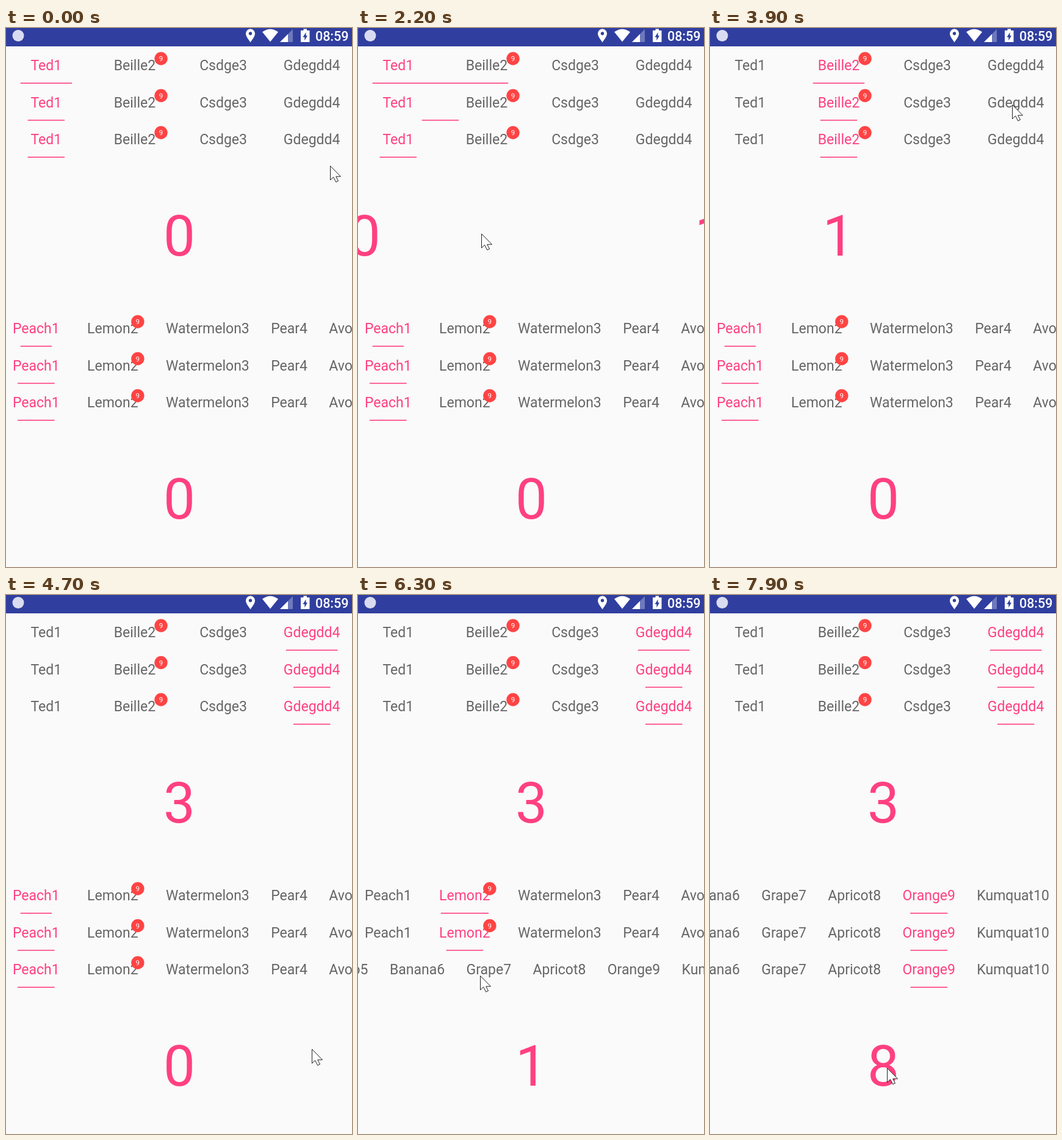
These frames come from a looping animation (567 px wide and 881 px high, 8 s). An HTML page with a canvas:

```html
<!DOCTYPE html>
<html lang="en">
<head>
<meta charset="utf-8">
<title>Tab layouts</title>
<style>
html, body { margin: 0; width: 100%; height: 100%; overflow: hidden; background: #fafafa; }
canvas { display: block; }
</style>
</head>
<body>
<canvas id="stage" width="567" height="881"></canvas>
<script>
const ctx = document.getElementById('stage').getContext('2d');
const W = 567, MID = W / 2, LOOP = 8000, STEP = 100, PAGE_LEAD = 14;
const PINK = '#ff4081', GREY = '#666', RED = '#ff4444';
const FONT = 'Roboto, sans-serif', TAB_FONT = '23px ' + FONT;
const PAD = 11, GAP = 13.4, INSET = 23.6, BAR = 60.5, ROW = 60.5;

const clamp = (v, a, b) => Math.max(a, Math.min(b, v));
const mix = (a, b, f) => a + (b - a) * f;

// Where the pointer turns, starts or stops: [time, x, y]
const POINTER = [
  [0, 531, 225], [1400, 386, 326], [2900, 41, 344], [3000, 41, 344],
  [3600, 430, 330], [3900, 495, 125], [4700, 501, 742], [5550, 11, 733], [5650, 11, 733],
  [6100, 490, 620], [6300, 200, 622], [6800, 475, 622], [7300, 180, 755], [7600, 290, 773]
];
function pointer(t) {
  const i = POINTER.findIndex(key => key[0] > t);
  if (i < 0) return POINTER.at(-1).slice(1);
  const [t0, x0, y0] = POINTER[i - 1], [t1, x1, y1] = POINTER[i];
  const f = (t - t0) / (t1 - t0);
  return [mix(x0, x1, f), mix(y0, y1, f)];
}

// Page position while the pointer drags away from startX, in direction dir
const dragged = (t, page, startX, dir) =>
  page + dir * Math.max(0, dir * (startX - pointer(t)[0])) / W;

// Quintic ease-out
const settle = (t, start, from, to, time) =>
  mix(from, to, 1 - (1 - clamp((t - start) / time, 0, 1)) ** 5);

// Pagers give their position and the selected tab
const TOP_FREE = 2963, TOP_TAP = 3910;
function topPager(t) {
  if (t < TOP_FREE) return { pos: dragged(t, 0, 472, 1), sel: 0 };
  if (t < TOP_TAP) return { pos: settle(t, TOP_FREE, dragged(TOP_FREE, 0, 472, 1), 1, 600), sel: 1 };
  return { pos: settle(t, TOP_TAP, 1, 3, 300), sel: 3 };
}
const LOW_GRAB = 4700, LOW_FREE = 5650, LOW_TAP = 6822, BACK_GRAB = 7330, BACK_FREE = 7540;
function lowPager(t) {
  if (t < LOW_GRAB) return { pos: 0, sel: 0 };
  if (t < LOW_FREE) return { pos: dragged(t, 0, 439, 1), sel: 0 };
  if (t < LOW_TAP) return { pos: settle(t, LOW_FREE, dragged(LOW_FREE, 0, 439, 1), 1, 600), sel: 1 };
  if (t < BACK_GRAB) return { pos: settle(t, LOW_TAP, 1, 9, 600), sel: 9 };
  if (t < BACK_FREE) return { pos: dragged(t, 9, 190, -1), sel: 9 };
  return { pos: settle(t, BACK_FREE, dragged(BACK_FREE, 9, 190, -1), 8, 400), sel: 8 };
}

function layout(names, width) {
  let x = 0;
  return names.map((name, i) => {
    const left = x, right = x + width(name, i);
    x = right + GAP;
    return { name, left, right, mid: (left + right) / 2 };
  });
}
ctx.font = TAB_FONT;
const topTabs = layout(['Ted1', 'Beille2', 'Csdge3', 'Gdegdd4'], () => (W - 3 * GAP) / 4);
const lowTabs = layout(
  ['Peach1', 'Lemon2', 'Watermelon3', 'Pear4', 'Avocado5', 'Banana6', 'Grape7', 'Apricot8', 'Orange9', 'Kumquat10'],
  (name, i) => ctx.measureText(name).width + 2 * PAD + (i === 1 ? 20 : 0));
const maxScroll = lowTabs.at(-1).right - W;

function between(tabs, pos) {
  const i = Math.floor(pos);
  return [tabs[i], tabs[Math.min(i + 1, tabs.length - 1)], pos - i];
}
function midAt(tabs, pos) {
  const [a, b, f] = between(tabs, pos);
  return mix(a.mid, b.mid, f);
}

// Two rows follow the pager; the third is flung by hand
const lowScroll = (row, pos, t) => row < 2
  ? clamp(midAt(lowTabs, pos) - MID, 0, maxScroll)
  : settle(t, 6100, 0, maxScroll, 600);

function text(str, x, y, font, color, align = 'center') {
  ctx.font = font;
  ctx.fillStyle = color;
  ctx.textAlign = align;
  ctx.fillText(str, x, y);
}
function disc(x, y, r, color) {
  ctx.fillStyle = color;
  ctx.beginPath();
  ctx.arc(x, y, r, 0, 7);
  ctx.fill();
}
function shape(d, x, y, fill, stroke) {
  const path = new Path2D(d);
  ctx.save();
  ctx.translate(x, y);
  ctx.fillStyle = fill;
  ctx.fill(path, 'evenodd');
  if (stroke) {
    ctx.strokeStyle = stroke;
    ctx.stroke(path);
  }
  ctx.restore();
}

function tabRow(tabs, row, y, { pos, sel }, scroll, badgeX) {
  ctx.save();
  ctx.translate(-scroll, y + row * ROW);
  tabs.forEach((tab, i) => text(tab.name, tab.mid, 69, TAB_FONT, i === sel ? PINK : GREY));

  // First bar stretches, second slides, third jumps
  let left, right;
  if (row === 0) {
    const [a, b, f] = between(tabs, pos);
    left = mix(a.left, b.left, Math.max(0, 2 * f - 1)) + INSET;
    right = mix(a.right, b.right, Math.min(1, 2 * f)) - INSET;
  } else {
    left = (row === 1 ? midAt(tabs, pos) : tabs[sel].mid) - BAR / 2;
    right = left + BAR;
  }
  ctx.fillStyle = PINK;
  ctx.fillRect(left, 89.4, right - left, 1.6);

  disc(badgeX, 50, 10.7, RED);
  text('9', badgeX, 54.2, '11.5px ' + FONT, '#fff');
  ctx.restore();
}

function pages(pos, baseline) {
  for (const i of new Set([Math.floor(pos), Math.ceil(pos)]))
    text(i, 284 + (i - pos) * W, baseline, '92.5px ' + FONT, PINK);
}

function statusBar() {
  ctx.fillStyle = '#303f9f';
  ctx.fillRect(0, 0, W, 30);
  disc(20, 12.5, 9.5, '#d9dcf0');
  // Location pin, wifi, signal, charging battery
  shape('M0 22C-4 16-7.5 12-7.5 7.5A7.5 7.5 0 0 1 7.5 7.5C7.5 12 4 16 0 22ZM-2.7 7.5A2.7 2.7 0 1 0 2.7 7.5A2.7 2.7 0 1 0-2.7 7.5Z', 400.5, 1.5, '#fff');
  shape('M0 20.5L-13 4.5Q0-5 13 4.5Z', 433, 2, '#fff');
  shape('M0 21L21 0V21Z', 449, 2, 'rgba(255,255,255,.3)');
  shape('M0 21L13 8V21Z', 449, 2, '#fff');
  shape('M4.5 0H10V2.5H14.5V21.5H0V2.5H4.5ZM8.5 5.5L3.5 13.5H6.3V19L11 11H8.5Z', 483, 1.5, '#fff');
  text('08:59', 561.5, 20.7, '500 21.5px ' + FONT, '#fff', 'right');
}

function draw(now) {
  const t = Math.floor(now % LOOP / STEP) * STEP;
  ctx.fillStyle = '#fafafa';
  ctx.fillRect(0, 0, W, 881);
  statusBar();

  const top = topPager(t), low = lowPager(t);
  for (let row = 0; row < 3; row++) {
    tabRow(topTabs, row, 0, top, 0, 254);
    tabRow(lowTabs, row, 430, low, lowScroll(row, low.pos, t), lowTabs[1].mid + 41);
  }
  pages(topPager(t + PAGE_LEAD).pos, 372);
  pages(lowPager(t + PAGE_LEAD).pos, 802);

  const [x, y] = pointer(t);
  shape('M0 0V23L5 18.2L9.2 26.3L13 24.5L9.2 17.3H17Z', Math.round(x) + 0.5, Math.round(y) + 0.5, '#fff', '#222');
  requestAnimationFrame(draw);
}
requestAnimationFrame(draw);
</script>
</body>
</html>
```
